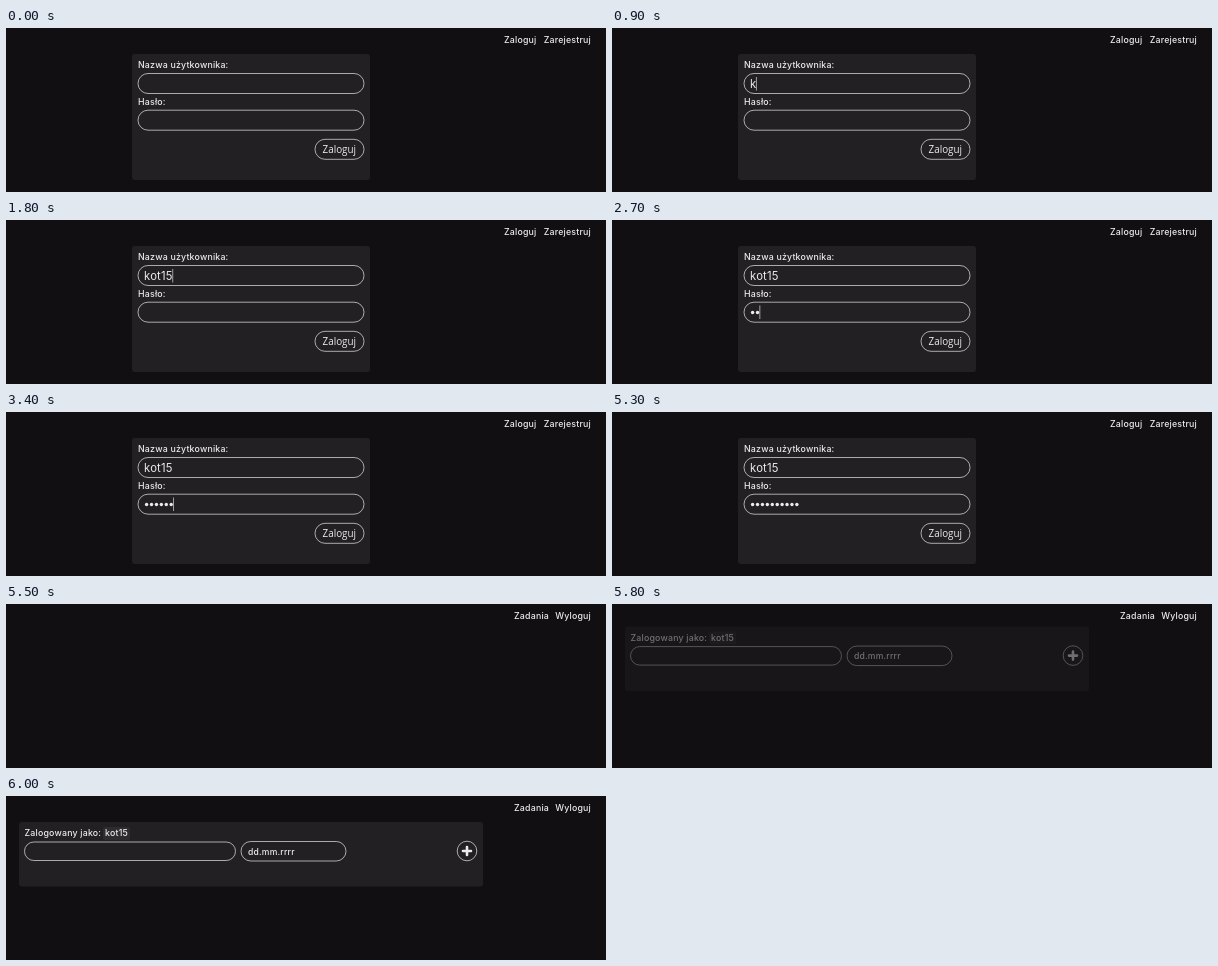
Animation of 600 by 164 pixels, one loop 6600 ms. Source, as an HTML page:

```html
<!DOCTYPE html>
<html lang="pl">
<head>
<meta charset="utf-8">
<style>
  html, body { margin: 0; height: 100%; overflow: hidden; background: #110f11; }
  svg { display: block; }
  text { font: 500 8.8px Inter, "Open Sans", sans-serif; letter-spacing: .2px; fill: #eceaec; white-space: pre; }
  .panel { fill: #222022; }
  .field { fill: none; stroke: #dad8da; stroke-width: .75; }
  #user { font-size: 11.3px; font-weight: 400; }
  .button { font: 500 9.9px "Open Sans", "Noto Sans", sans-serif; letter-spacing: 0; }
  .date { font-size: 8.6px; }
  .end { text-anchor: end; }
  .badge { fill: #2e2c30; }
  #dots { fill: #eceaec; }
  #caret { stroke: #dad8da; stroke-width: .7; }
  .plus { stroke: #eceaec; stroke-width: 2.6; stroke-linecap: round; }
</style>
</head>
<body>
<svg width="600" height="164" viewBox="0 0 600 164">
  <g id="login">
    <text x="498" y="14.5">Zaloguj</text>
    <text class="end" x="585" y="14.5">Zarejestruj</text>
    <rect class="panel" x="126" y="26" width="238" height="126" rx="3"/>
    <text x="132" y="40.3">Nazwa użytkownika:</text>
    <rect class="field" x="132" y="45.5" width="226" height="20" rx="10"/>
    <text id="user" x="138" y="59.5"></text>
    <text x="132" y="77.3">Hasło:</text>
    <rect class="field" x="132" y="82.2" width="226" height="20" rx="10"/>
    <g id="dots"></g>
    <path id="caret"/>
    <rect class="field" x="309" y="111.3" width="49" height="20" rx="10"/>
    <text class="button" x="316.5" y="125">Zaloguj</text>
  </g>
  <g id="home">
    <text class="end" x="543" y="14.5">Zadania</text>
    <text class="end" x="585" y="14.5">Wyloguj</text>
    <g id="tasks">
      <rect class="panel" x="13" y="26" width="464" height="64.5" rx="3"/>
      <text x="18.5" y="40.3">Zalogowany jako:</text>
      <rect class="badge" x="97" y="31" width="27" height="13" rx="2"/>
      <text id="name" x="99" y="40.3"></text>
      <rect class="field" x="18.5" y="46" width="211" height="18.5" rx="9.25"/>
      <rect class="field" x="235" y="45.5" width="105" height="19.5" rx="9.75"/>
      <text class="date" x="242" y="58.5">dd.mm.rrrr</text>
      <circle class="field" cx="461" cy="55" r="9.8"/>
      <path class="plus" d="M457 55h8M461 51v8"/>
    </g>
  </g>
</svg>
<script>
const LOOP = 6600, STEP = 100, USER = "kot15";
const keyTimes = [900, 1300, 1400, 1600, 1800];
const dotPitch = 4.92, dotCount = 10;
const $ = id => document.getElementById(id);
const show = (el, on) => el.style.display = on ? "" : "none";
const clamp = (v, lo, hi) => Math.max(lo, Math.min(hi, v));

$("name").textContent = USER;
for (let i = 0; i < dotCount; i++) {
  const dot = document.createElementNS("http://www.w3.org/2000/svg", "circle");
  dot.setAttribute("cx", 140.6 + i * dotPitch);
  dot.setAttribute("cy", 92.5);
  dot.setAttribute("r", 1.7);
  $("dots").append(dot);
}

function draw(t) {
  const home = t >= 5500;
  show($("login"), !home);
  show($("home"), home);

  if (home) {
    const p = clamp((t - 5500) / 500, 0, 1) ** 1.65;
    $("tasks").setAttribute("opacity", p);
    $("tasks").setAttribute("transform", `translate(0 ${-6 * (1 - p)})`);
    return;
  }

  $("user").textContent = USER.slice(0, keyTimes.filter(k => t >= k).length);
  const typed = clamp(Math.floor((t - 2500) / 160) + 1, 0, dotCount);
  [...$("dots").children].forEach((dot, i) => show(dot, i < typed));

  const inPassword = t >= 2200;
  const x = inPassword
    ? 138 + typed * dotPitch
    : 138 + (t >= keyTimes[0] ? $("user").getComputedTextLength() : 0);
  $("caret").setAttribute("d", `M${x} ${inPassword ? 85.5 : 49}v13.5`);
  show($("caret"), t >= 700 && t < 4400 || t >= 4900 && t < 5300);
}

function tick(now) {
  draw(Math.floor(now % LOOP / STEP) * STEP);
  requestAnimationFrame(tick);
}
draw(0);
requestAnimationFrame(tick);
</script>
</body>
</html>
```
